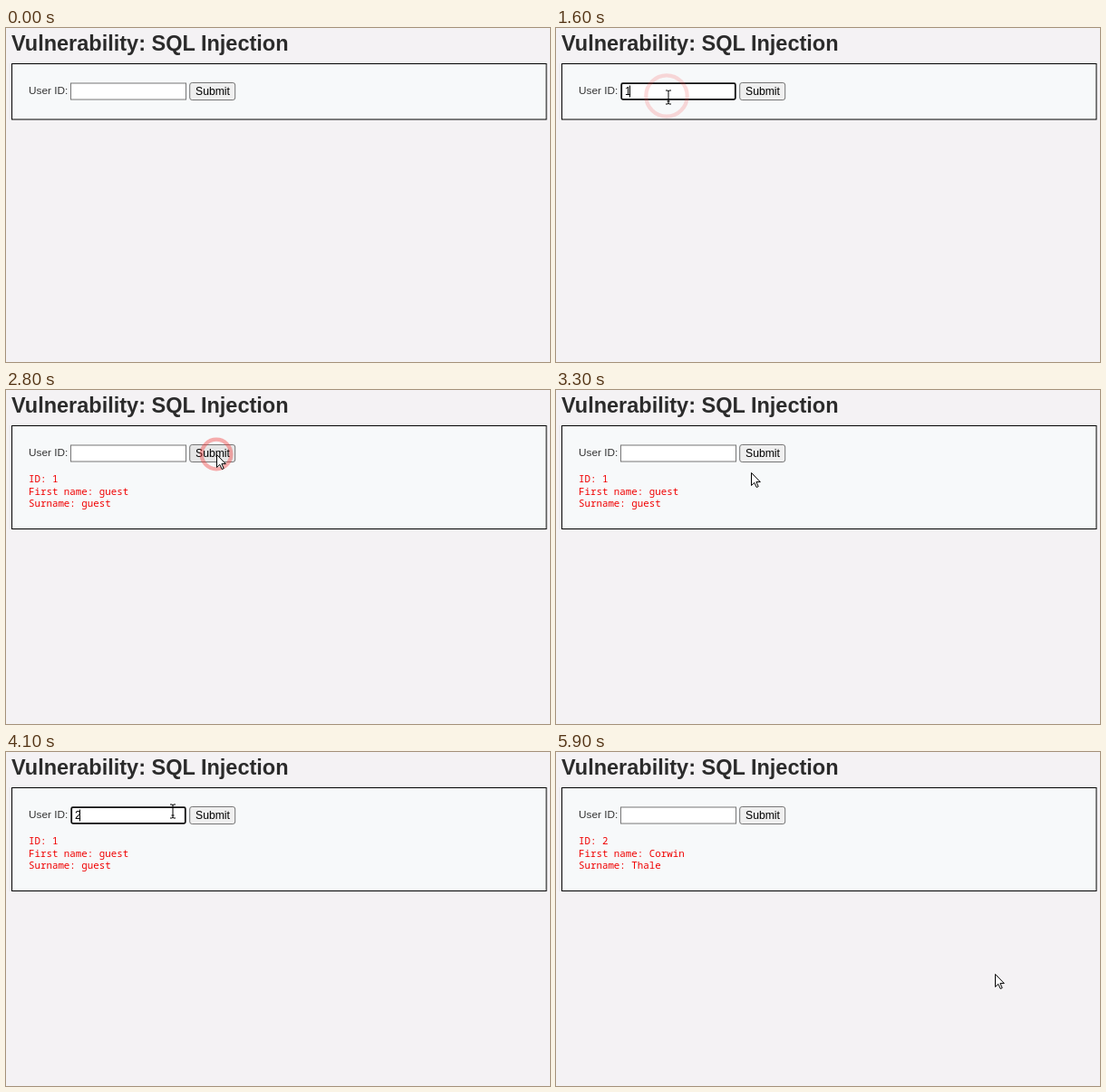
Write an HTML page that moves like this. It is 600 px wide and 369 px high and loops after 6 s.

```html
<!DOCTYPE html>
<html lang="en">
<head>
<meta charset="utf-8">
<title>SQL Injection</title>
<style>
  html, body { margin: 0; width: 100%; height: 100%; overflow: hidden; background: #f4f2f4; }
  svg { display: block; width: 600px; height: 369px; }
  text { white-space: pre; }
  .ui { font-family: "Liberation Sans", Arial, sans-serif; font-size: 12.2px; }
  .result { font: 10.8px "Noto Sans Mono", monospace; fill: #f00000; }
  .menu { font: 10.4px "Open Sans", sans-serif; fill: #0c0c0c; }
  #menuBox { filter: drop-shadow(0 7px 7px rgba(0, 0, 0, .4)); }
</style>
</head>
<body>
<svg viewBox="0 0 600 369">
  <rect width="600" height="369" fill="#f4f2f4"/>
  <text class="ui" x="6" y="24.5" fill="#2b2b2b" style="font-size:23.5px;font-weight:bold">Vulnerability: SQL Injection</text>
  <rect id="panel" x="6.5" y="39.5" width="589.5" fill="#f7f9fa" stroke="#000"/>
  <text class="ui" x="25" y="73.2" fill="#333" style="font-size:11.8px">User ID:</text>
  <rect id="field" fill="#fff"/>
  <text class="ui" id="typed" x="76" y="74"></text>
  <rect id="caret" y="63.5" width="1" height="13"/>
  <rect id="button" x="202.7" y="60.5" width="50" height="19" rx="2.5" stroke="#767676"/>
  <text class="ui" x="228" y="74" text-anchor="middle">Submit</text>
  <g id="result" class="result"></g>
  <g id="menu" class="menu"><rect id="menuBox" x="71.5" y="80" width="289" rx="3" fill="#fefdfe"/></g>
  <circle id="ring" fill="none" stroke="#f03c3c" stroke-width="4.2"/>
  <g id="cursor">
    <path id="arrow" d="M.5 .5V14.5L3.8 11.4 6.2 16.5 8.2 15.6 5.9 10.6H10.3Z" fill="#fff" stroke="#000"/>
    <path id="beam" transform="translate(0 .5)" d="M-3 -7.5H-1L0 -6.8 1 -7.5H3M0 -7V7M-3 7.5H-1L0 6.8 1 7.5H3M-1.5 4.5H1.5" fill="none" stroke="#000"/>
  </g>
</svg>
<script>
const STEP = 100, STEPS = 60;

// Pointer stops: step, x, y
const path = [
  [1, 385, 259], [7, 129, 104], [10, 126, 83], [13, 124, 76], [18, 124, 76],
  [25, 232, 71], [28, 232, 71], [32, 222, 96], [36, 174, 66], [37, 174, 65], [39, 174, 65],
  [46, 222, 66], [48, 222, 66], [52, 187, 100], [53, 187, 100], [59, 484, 245]
];
// Clicks: step, x, y
const clicks = [[13, 122, 75], [26, 232, 71], [37, 173, 65], [46, 221, 67]];
// Each round of input: focus, key, blur and reply steps
const rounds = [
  { focus: 13, key: 15, blur: 26, reply: 27, id: "1", first: "guest", last: "guest", rows: 5 },
  { focus: 37, key: 39, blur: 46, reply: 47, id: "2", first: "Corwin", last: "Thale", rows: 6 }
];
const history = [
  "' order by 3-- -", "' order by 2-- -", "' union select 1,2-- -",
  "' union select user,password from users- -",
  "' union select user,password from users-- -", "1"
];

const $ = id => document.getElementById(id);
const set = (id, attrs) => {
  for (const name in attrs) $(id).setAttribute(name, attrs[name]);
};
const show = (id, on) => set(id, { visibility: on ? "visible" : "hidden" });
const addText = (parent, x, y, value = "") => {
  const el = document.createElementNS("http://www.w3.org/2000/svg", "text");
  el.setAttribute("x", x);
  el.setAttribute("y", y);
  el.textContent = value;
  return $(parent).appendChild(el);
};

const lines = [0, 1, 2].map(i => addText("result", 25, 102.4 + i * 13.5));
const rows = history.map((value, i) => addText("menu", 83, 103.8 + i * 30.8, value));

function pointerAt(step) {
  const i = path.findIndex(p => p[0] >= step);
  const b = path[i], a = path[i - 1] || b;
  const u = a === b ? 1 : (step - a[0]) / (b[0] - a[0]);
  const e = u * u * (3 - 2 * u);
  return [a[1] + (b[1] - a[1]) * e, a[2] + (b[2] - a[2]) * e];
}

function drawPointer(step) {
  const [x, y] = pointerAt(step);
  const inRow = y >= 60 && y < 80;
  const overField = inRow && x >= 71 && x < 199;
  const overButton = inRow && x >= 202 && x < 253;
  set("cursor", { transform: `translate(${Math.round(x)} ${Math.round(y)})` });
  show("arrow", step > 0 && !overField);
  show("beam", step > 0 && overField);
  set("button", { fill: overButton ? "#e6e6e6" : "#efefef" });
}

function drawRing(step) {
  const click = clicks.find(c => step >= c[0] && step < c[0] + 4);
  show("ring", click);
  if (!click) return;
  const k = step - click[0];
  set("ring", { cx: click[1], cy: click[2], r: 3.5 + 6.4 * k, opacity: 0.86 - 0.225 * k });
}

function drawField(step) {
  const now = rounds.find(r => step >= r.focus && step < r.reply);
  const focused = now && step < now.blur;
  const typed = now && step >= now.key;
  const open = focused && !typed;

  set("field", focused
    ? { x: 72.2, y: 61.2, width: 125.6, height: 17.6, rx: 1.5, stroke: "#101010", "stroke-width": 1.8 }
    : { x: 71.5, y: 61, width: 127, height: 18, rx: 0, stroke: "#767676", "stroke-width": 1 });
  $("typed").textContent = typed ? now.id : "";
  set("caret", { x: typed ? 81 : 75 });
  show("caret", focused && (step - (typed ? now.key : now.focus)) % 10 < 5);

  set("menu", { display: open ? "inline" : "none" });
  if (open) {
    set("menuBox", { height: 7.2 + now.rows * 30.8 });
    rows.forEach((el, i) => el.setAttribute("display", i < now.rows ? "inline" : "none"));
  }
}

function drawResult(step) {
  const done = rounds.filter(r => step >= r.reply).pop();
  set("panel", { height: done ? 114 : 61.5 });
  const values = done
    ? ["ID: " + done.id, "First name: " + done.first, "Surname: " + done.last]
    : ["", "", ""];
  lines.forEach((el, i) => { el.textContent = values[i]; });
}

const start = performance.now();
let last = -1;

function tick() {
  const step = Math.floor((performance.now() - start) / STEP) % STEPS;
  if (step !== last) {
    last = step;
    drawResult(step);
    drawField(step);
    drawRing(step);
    drawPointer(step);
  }
  requestAnimationFrame(tick);
}
tick();
</script>
</body>
</html>
```
